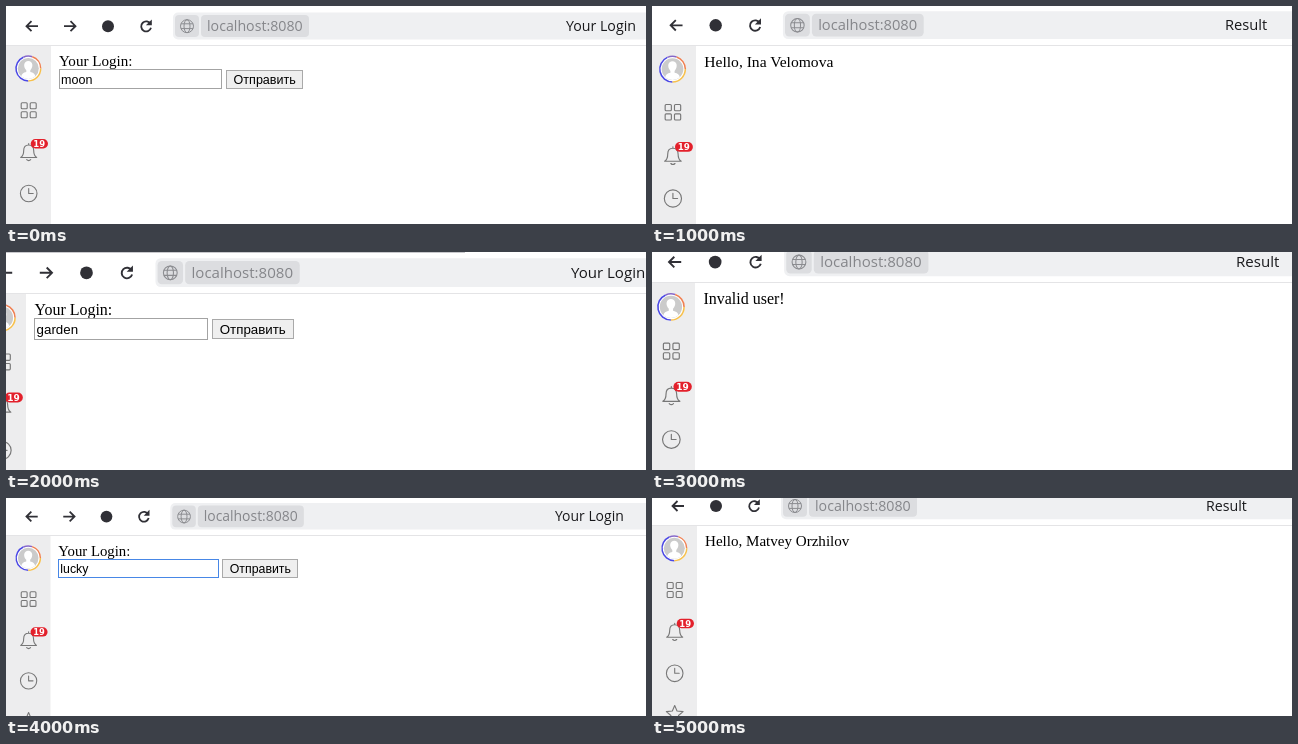
Write an HTML page that moves like this. It is 640 px wide and 218 px high and loops after 6 s.

```html
<!DOCTYPE html>
<html lang="en">
<head>
<meta charset="utf-8">
<title>Login form</title>
<style>
  html, body { margin: 0; width: 100%; height: 100%; overflow: hidden; background: #fff; }
  svg { display: block; }
  .ui { font: 14.2px "Open Sans", "Noto Sans", sans-serif; }
  .page { font: 15.07px "Liberation Serif", "Times New Roman", serif; }
  .field, .button { font: 12.56px "Liberation Sans", Arial, sans-serif; }
  .badge { font: bold 8.5px "DejaVu Sans", sans-serif; }
  .button, .badge { text-anchor: middle; }
  .line { fill: none; stroke: #777; stroke-width: 1.1; stroke-linejoin: round; stroke-linecap: round; }
  .nav { fill: none; stroke: #303036; stroke-width: 1.8; }
  .crisp { vector-effect: non-scaling-stroke; shape-rendering: crispEdges; }
</style>
</head>
<body>
<svg id="stage" width="640" height="218" viewBox="0 0 640 218">
  <defs>
    <path id="arrow" class="nav" d="M6 0H-5.5M-.5 -5L-5.5 0L-.5 5"/>
    <g id="reload">
      <path class="nav" d="M4.6 -2.2A5 5 0 1 0 5 1.6"/>
      <path d="M5.8 -6.8V-.9H-.1Z" fill="#303036"/>
    </g>
    <g id="globe" fill="none" stroke="#8b8c90" stroke-width="1">
      <circle r="6.5"/>
      <ellipse rx="3" ry="6.5"/>
      <path d="M-6 -2.4H6M-6 2.4H6"/>
    </g>
    <g id="sidebar">
      <g transform="translate(-22.7 23)">
        <circle r="13" fill="#fff"/>
        <circle r="10.5" fill="#cbcbcb"/>
        <path d="M-7 7.8Q-6.5 4.5 -2 3.6V1.8C-5.5 -2 -4.5 -7.5 0 -7.5S5.5 -2 2 1.8V3.6Q6.5 4.5 7 7.8A10.5 10.5 0 0 1 -7 7.8Z" fill="#fff"/>
        <g fill="none" stroke-width="1.5">
          <path d="M0 12.4A12.4 12.4 0 0 1 -5 -11.3" stroke="#4b48e4"/>
          <path d="M-5 -11.3A12.4 12.4 0 0 1 4 -11.7" stroke="#8668c8"/>
          <path d="M4 -11.7A12.4 12.4 0 0 1 12.4 0" stroke="#ef8053"/>
          <path d="M12.4 0A12.4 12.4 0 0 1 0 12.4" stroke="#f6c04d"/>
        </g>
      </g>
      <g id="tiles" class="line" transform="translate(-22.3 64.7)"></g>
      <g transform="translate(-22.3 106.5)">
        <path class="line" d="M-8 5.5Q-5 3.5 -5 -1.5C-5 -5.2 -3 -7 0 -7S5 -5.2 5 -1.5Q5 3.5 8 5.5ZM-2 7.7Q0 9.7 2 7.7M0 -7V-8.5"/>
        <rect x="2" y="-13" width="17.3" height="9.4" rx="4.7" fill="#e3202b"/>
        <text class="badge" x="10.6" y="-5.2" fill="#fff">19</text>
      </g>
      <g class="line" transform="translate(-22.3 148)">
        <circle r="8.3"/>
        <path d="M0 -5V0H4.5"/>
      </g>
      <path id="favourite" class="line" transform="translate(-22.3 189)"/>
    </g>
  </defs>
</svg>
<script>
const HOLD = 1000;

// edge: right side of the sidebar, top: bottom of the toolbar
const scenes = [
  { edge: 45, top: 39.5, scale: 1, title: 'Your Login', titleX: 560, login: 'moon' },
  { edge: 44, top: 39.3, scale: 1.035, title: 'Result', titleX: 573, reply: 'Hello, Ina Velomova' },
  { edge: 20, top: 41.3, scale: 1.061, title: 'Your Login', titleX: 565, login: 'garden', tabLine: 459 },
  { edge: 43, top: 30.5, scale: 1.061, title: 'Result', titleX: 584, reply: 'Invalid user!' },
  { edge: 44.5, top: 37.5, scale: 0.982, title: 'Your Login', titleX: 549, login: 'lucky', focused: true },
  { edge: 45, top: 27.3, scale: 1, title: 'Result', titleX: 554, reply: 'Hello, Matvey Orzhilov' },
];

const use = (id, x, y, extra = '') =>
  `<use href="#${id}" transform="translate(${x} ${y}) ${extra}"/>`;
const box = (x, y, w, h, fill, more = '') =>
  `<rect x="${x}" y="${y}" width="${w}" height="${h}" fill="${fill}" ${more}/>`;
const label = (kind, x, y, text, fill = '#000') =>
  `<text class="${kind}" x="${x}" y="${y}" fill="${fill}">${text}</text>`;

function toolbar(scene) {
  const shift = scene.login ? 0 : -38;
  const y = -19.3;
  return use('arrow', -19, y)
    + (scene.login ? use('arrow', 19, y, 'scale(-1 1)') : '')
    + `<circle cx="${57 + shift}" cy="${y}" r="6" fill="#303036"/>`
    + use('reload', 95 + shift, y)
    + box(122 + shift, -33, 620, 27, '#eff0f2', 'rx="5"')
    + box(124 + shift, -30.5, 24, 22, '#dcdde0', 'rx="4"')
    + use('globe', 136 + shift, y)
    + box(150 + shift, -30.5, 108, 22, '#dcdde0', 'rx="4"')
    + label('ui', 156 + shift, -14.5, 'localhost:8080', '#85868a')
    + label('ui', (scene.titleX - scene.edge) / scene.scale, -14.5, scene.title, '#18181b');
}

function page({ login, reply, focused }) {
  if (reply) return label('page', 8, 20.7, reply);
  const border = focused ? '#4787e6' : '#a3a3a3';
  return label('page', 8, 20.7, 'Your Login:')
    + box(8.4, 24.2, 162.5, 19, '#fff', `class="crisp" stroke="${border}"`)
    + label('field', 10, 38, login)
    + box(175.4, 24.9, 76.5, 17.8, '#efefef', 'class="crisp" stroke="#a9a9a9"')
    + label('button', 213.7, 38, 'Отправить');
}

function draw(scene) {
  const { edge, top, scale, tabLine } = scene;
  const lineY = Math.floor(top);
  return `<g visibility="hidden">`
    + box(0, lineY, edge, 218, '#ededee')
    + box(0, lineY, 640, 1, '#e4e4e6')
    + (tabLine ? box(0, 0, tabLine, 1, '#c8c8cc') : '')
    + `<g transform="translate(${edge} ${top}) scale(${scale})">`
    + toolbar(scene) + use('sidebar', 0, 0) + page(scene)
    + `</g></g>`;
}

document.getElementById('tiles').innerHTML = [[-7.5, -7.5], [1.5, -7.5], [-7.5, 1.5], [1.5, 1.5]]
  .map(([x, y]) => box(x, y, 6, 6, 'none', 'rx="1"')).join('');

const spikes = Array.from({ length: 10 }, (_, i) => {
  const radius = i % 2 ? 4 : 8.8;
  const angle = (i / 5 - 0.5) * Math.PI;
  return [radius * Math.cos(angle), radius * Math.sin(angle)].map(v => v.toFixed(2)).join(' ');
});
document.getElementById('favourite').setAttribute('d', `M${spikes.join('L')}Z`);

const stage = document.getElementById('stage');
const layer = document.createElementNS('http://www.w3.org/2000/svg', 'g');
layer.innerHTML = scenes.map(draw).join('');
stage.append(layer);

const origin = performance.now();
function tick() {
  const current = Math.floor((performance.now() - origin) / HOLD) % scenes.length;
  [...layer.children].forEach((view, i) =>
    view.setAttribute('visibility', i === current ? 'visible' : 'hidden'));
  requestAnimationFrame(tick);
}
tick();
</script>
</body>
</html>
```
